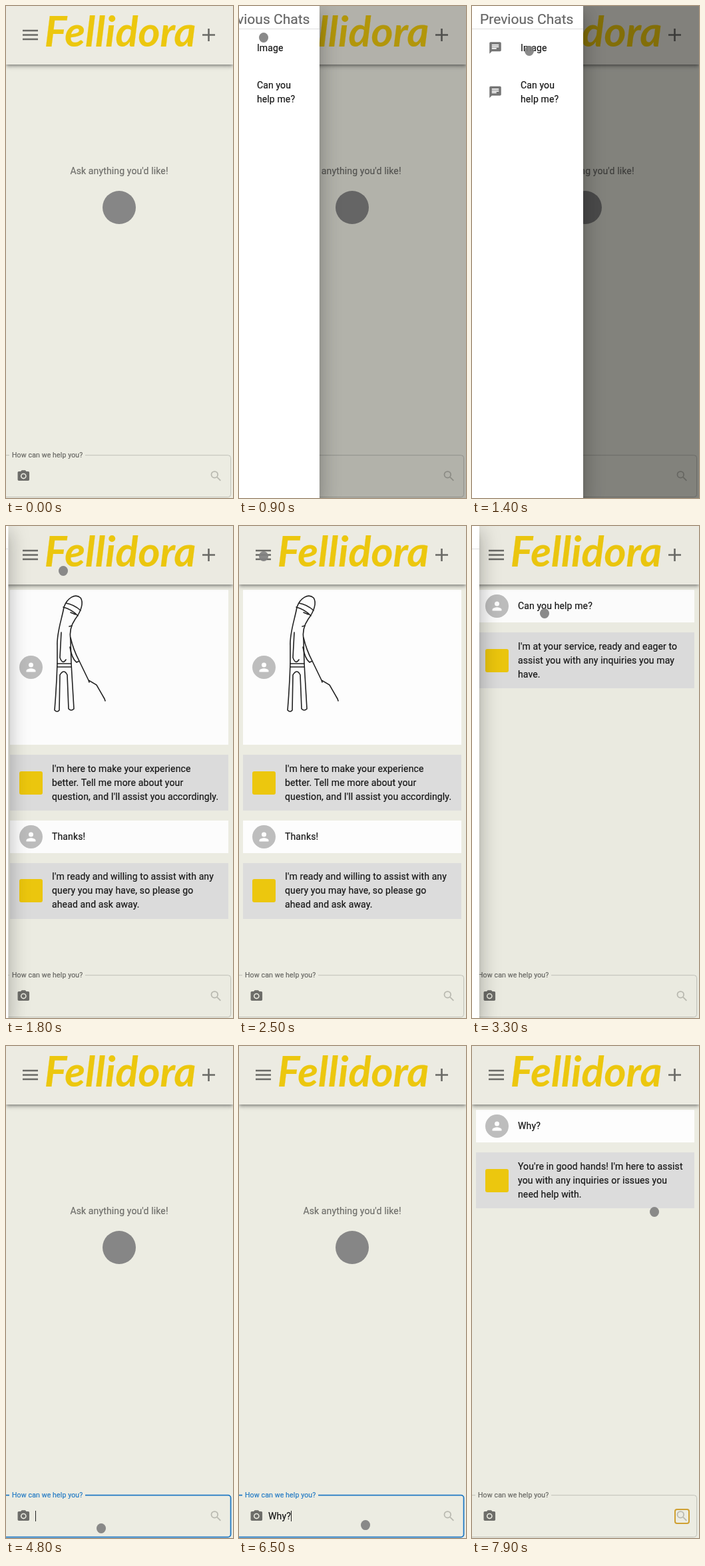
An HTML page that plays this animation: 341x740 px, repeating every 8 s.

```html
<!DOCTYPE html>
<html lang="en">
<head>
<meta charset="utf-8">
<title>Chat assistant</title>
<style>
html, body { margin: 0; width: 100%; height: 100%; overflow: hidden; }
body { position: relative; background: #ecece2; font: 14px/21px Roboto, sans-serif; letter-spacing: .00938em; color: #161616; -webkit-text-stroke: .2px; }
body *, svg { position: absolute; box-sizing: border-box; white-space: nowrap; }
svg { overflow: visible; left: 0; top: 0; }
header { left: 0; top: 0; width: 100%; height: 88px; background: #ecebe2; box-shadow: 0 2px 4px -1px rgba(0,0,0,.35), 0 4px 5px rgba(0,0,0,.14), 0 1px 10px rgba(0,0,0,.12); }
h1 { margin: 0; left: 47px; top: -1px; width: 249px; text-align: center; font: italic bold 63px/76px Lato, sans-serif; letter-spacing: 0; color: #ecc70e; }
.page { left: 0; top: 0; width: 100%; height: 100%; }
.ask { top: 238px; width: 340px; text-align: center; color: #6f6f6b; }
.mark { left: 145px; top: 278px; width: 50px; height: 50px; border-radius: 50%; background: #868686; }
.row { left: 6px; width: 328px; background: #fdfdfd; }
.row.bot { background: #dcdcdc; }
.row p { margin: 0; left: 63px; white-space: pre; }
.face { left: 14px; width: 35px; height: 35px; border-radius: 50%; background: #bdbdbd; }
.bot .face { border-radius: 3px; background: #ecc70e; }
.face svg { left: 7px; top: 7px; }
#label { left: 5px; top: 665px; padding: 0 4px; background: #ecece2; font-size: 10.5px; color: #666662; }
#typed { left: 44px; top: 697px; }
#typed span { position: static; }
#caret { border-left: 1px solid #222; }
#ring { left: 304px; top: 696px; width: 23px; height: 23px; border: 2px solid #cfa032; border-radius: 4px; }
#shade { left: 0; top: 0; width: 100%; height: 100%; background: #000; }
#drawer { left: 0; top: 0; width: 167px; height: 100%; background: #fff; box-shadow: 0 8px 10px -5px rgba(0,0,0,.2), 0 16px 24px 2px rgba(0,0,0,.14), 0 6px 30px 5px rgba(0,0,0,.12); }
#drawer h2 { margin: 0; left: 0; top: 0; width: 167px; height: 35px; padding: 5px 12px; border-bottom: 1px solid #dedede; font: 21px/30px Roboto, sans-serif; letter-spacing: 0; color: #666; }
#drawer p { margin: 0; left: 73px; white-space: pre; }
#dot { left: -7px; top: -7.5px; width: 14px; height: 15px; border-radius: 50%; background: #808080; opacity: .92; }
</style>
</head>
<body>
<div class="page" id="home"><div class="ask">Ask anything you'd like!</div><div class="mark"></div></div>
<div class="page" id="image"></div>
<div class="page" id="help"></div>
<div class="page" id="why"></div>
<header>
  <svg width="341" height="88" fill="none" stroke="#6a6a66" stroke-width="2.6"><path d="M25 37h23M25 43.5h23M25 50h23M295 43.5h19M304.5 34v19"/></svg>
  <h1>Fellidora</h1>
</header>
<svg width="341" height="740">
  <rect id="box" x="-12" y="675.7" width="349.6" height="62.9" rx="4" fill="none"/>
  <g transform="translate(15.8 696.5) scale(.875)" fill="#6d6d69">
    <path fill-rule="evenodd" d="M9 2 7.17 4H4c-1.1 0-2 .9-2 2v12c0 1.1.9 2 2 2h16c1.1 0 2-.9 2-2V6c0-1.1-.9-2-2-2h-3.17L15 2zM12 7a5 5 0 1 1 0 10a5 5 0 1 1 0-10z"/><circle cx="12" cy="12" r="3.2"/>
  </g>
  <g transform="translate(305 696.5) scale(.875)" fill="none" stroke="#b9b9b0" stroke-width="2"><circle cx="9.5" cy="9.5" r="5.5"/><path d="M13.8 13.8l6 6"/></g>
</svg>
<div id="label">How can we help you?</div>
<div id="typed"><span id="text"></span><span id="caret"></span></div>
<div id="ring"></div>
<div id="shade"></div>
<div id="drawer">
  <h2>Previous Chats</h2>
  <svg width="60" height="160" fill="#757575"><path id="chat" transform="translate(24.5 52.5) scale(.875)" d="M20 2H4c-1.1 0-2 .9-2 2v18l4-4h14c1.1 0 2-.9 2-2V4c0-1.1-.9-2-2-2zM6 9h12v2H6zm8 5H6v-2h8zm4-6H6V6h12z"/><use href="#chat" y="66.5"/></svg>
  <p style="top:53px">Image</p>
  <p style="top:109px">Can you
help me?</p>
</div>
<div id="dot"></div>
<script>
const $ = id => document.getElementById(id);
const show = (id, on) => $(id).style.visibility = on ? 'visible' : 'hidden';

const person = '<svg width="21" height="21" viewBox="0 0 24 24" fill="#fff"><circle cx="12" cy="8" r="4"/><path d="M12 14c-2.67 0-8 1.34-8 4v2h16v-2c0-2.66-5.33-4-8-4z"/></svg>';
const sketch = `<svg width="328" height="233" viewBox="6 96 328 233" fill="none" stroke="#222" stroke-width="1.6" stroke-linecap="round">
  <path d="M87 122C92 108 104 101 112 108C117 115 113 128 104 140C97 150 95 160 97 172L98 207M87 122C84 140 76 160 77 180V207"/>
  <path d="M86 122Q98 125 108 135M90 116Q102 118 112 127M97 130l7 3M95 151l4-1"/>
  <path d="M83 160L81 198Q85 209 90 201M97 168Q101 186 110 203M96 182Q99 200 106 205L110 203L124 232L136 239L148 260M124 232l1 3M148 260l1 3"/>
  <path d="M77 207H98M77 212H98M77 207Q76 240 73 277Q77 281 80 277L81 224Q87 214 92 224L94 275Q98 279 102 275L98 207"/></svg>`;

// Adds one chat row; the text block is centred vertically.
function row(page, top, height, text, bot) {
  const lines = text.split('\n').length;
  $(page).innerHTML += `<div class="row ${bot ? 'bot' : ''}" style="top:${top}px;height:${height}px">
    <div class="face" style="top:${height / 2 - 17.5}px">${bot ? '' : person}</div>
    ${text ? `<p style="top:${(height - lines * 21) / 2}px">${text}</p>` : sketch}</div>`;
}
row('image', 96, 233, '');
row('image', 344, 84, "I'm here to make your experience\nbetter. Tell me more about your\nquestion, and I'll assist you accordingly.", true);
row('image', 442.5, 49, 'Thanks!');
row('image', 506.5, 84, "I'm ready and willing to assist with any\nquery you may have, so please go\nahead and ask away.", true);
row('help', 96, 49, 'Can you help me?');
row('help', 160, 84, "I'm at your service, ready and eager to\nassist you with any inquiries you may\nhave.", true);
row('why', 96, 49, 'Why?');
row('why', 160, 84, "You're in good hands! I'm here to assist\nyou with any inquiries or issues you\nneed help with.", true);
const answer = $('why').lastElementChild;

// cubic-bezier(a, 0, b, 1)
function ease(x, a, b) {
  if (x <= 0 || x >= 1) return x <= 0 ? 0 : 1;
  let lo = 0, hi = 1, s;
  for (let i = 0; i < 24; i++) {
    s = (lo + hi) / 2;
    if (3 * s * (1 - s) * ((1 - s) * a + s * b) + s ** 3 < x) lo = s; else hi = s;
  }
  return s * s * (3 - 2 * s);
}

const visits = [[818, 1625], [2605, 3140]]; // drawer opens, closes
const path = [ // time, x, y of the pointer
  [400, 150, 250], [700, 37, 47], [1000, 37, 47], [1400, 86, 67], [1900, 86, 67],
  [2200, 37, 45], [2650, 37, 45], [2800, 75, 115], [2950, 109, 131], [3400, 109, 131],
  [3900, 304, 44], [4100, 304, 44], [4700, 143, 725], [6400, 143, 725],
  [6700, 315, 707], [7600, 315, 707], [7900, 274, 249], [8000, 274, 249]];
const keys = [5580, 5680, 5880, 6180];
const focusAt = 4700, sendAt = 6750;

function pointer(t) {
  const i = path.findIndex(p => p[0] > t);
  const [t0, x0, y0] = path[i - 1], [t1, x1, y1] = path[i];
  const k = ease((t - t0) / (t1 - t0), .3, .7);
  return [x0 + (x1 - x0) * k, y0 + (y1 - y0) * k];
}

function draw(now) {
  const t = now % 8000;
  const page = t < 1625 ? 'home' : t < 3140 ? 'image' : t < 4000 ? 'help' : t < sendAt ? 'home' : 'why';
  for (const p of ['home', 'image', 'help', 'why']) $(p).style.display = p === page ? 'block' : 'none';
  answer.style.display = t < 7650 ? 'none' : 'block';

  let open = 0, dim = 0;
  for (const [a, b] of visits) {
    if (t < a || t > b + 195) continue;
    const inn = (t - a) / 225, out = (t - b) / 195;
    open = ease(inn, 0, .2) - ease(out, .4, .6);
    dim = ease(inn, .4, .2) - ease(out, .4, .2);
  }
  show('drawer', open > 0);
  $('drawer').style.transform = `translateX(${(open - 1) * 167}px)`;
  $('shade').style.opacity = dim * .45;

  const focus = t >= focusAt && t < sendAt;
  $('box').style.stroke = focus ? '#2079c4' : '#bfc0b8';
  $('box').style.strokeWidth = focus ? 1.8 : 1;
  $('label').style.color = focus ? '#2079c4' : '#666662';
  const n = keys.filter(k => t >= k).length;
  $('text').textContent = focus ? 'Why?'.slice(0, n) : '';
  show('caret', focus && (t - (n ? keys[n - 1] : focusAt)) % 1000 < 500);
  show('ring', t >= sendAt);

  show('dot', t >= 400);
  if (t >= 400) {
    const [x, y] = pointer(t);
    $('dot').style.transform = `translate(${x}px,${y}px)`;
  }
  requestAnimationFrame(() => draw(performance.now()));
}
draw(performance.now());
</script>
</body>
</html>
```
